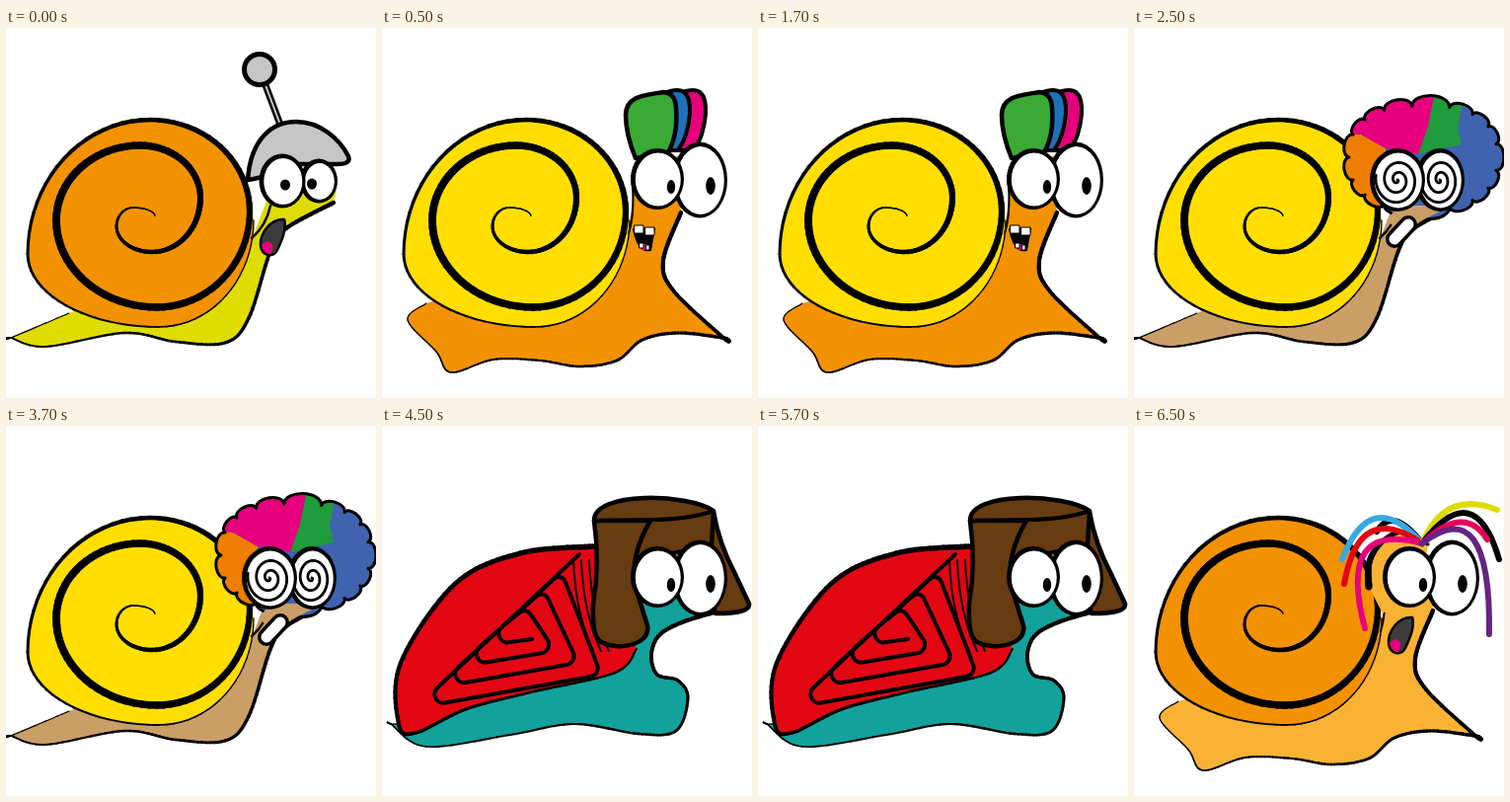
An HTML page with a canvas for the animation above (8000 ms loop, 375 by 375 pixels).

```html
<!DOCTYPE html>
<html lang="en">
<head>
<meta charset="utf-8">
<title>Snails</title>
<style>
html, body { margin: 0; width: 100%; height: 100%; overflow: hidden; background: #fff; }
canvas { display: block; width: 375px; height: 375px; }
</style>
</head>
<body>
<canvas id="c" width="375" height="375"></canvas>
<script>
const ctx = document.getElementById('c').getContext('2d');
ctx.lineCap = ctx.lineJoin = 'round';

const mix = (a, b, t) => a + (b - a) * t;

// "x,y x,y"; a trailing ! makes a sharp corner
const parse = text => text.split(' ').flatMap(t => {
  const p = t.replace('!', '').split(',').map(Number);
  return t.endsWith('!') ? [p, p] : [p];
});

// smooth curve through a few key points
function trace(text) {
  const p = parse(text), out = [];
  const at = i => p[Math.max(0, Math.min(p.length - 1, i))];
  for (let i = 0; i < p.length - 1; i++) {
    const [a, b, c, d] = [at(i - 1), at(i), at(i + 1), at(i + 2)];
    for (let t = 0; t < 1; t += 1 / 12)
      out.push([0, 1].map(j => b[j] + t / 2 * (c[j] - a[j] +
        t * (2 * a[j] - 5 * b[j] + 4 * c[j] - d[j] + t * (3 * (b[j] - c[j]) + d[j] - a[j])))));
  }
  return [...out, at(p.length)];
}

function paint(path, fill, width, stroke = '#000') {
  if (fill) { ctx.fillStyle = fill; ctx.fill(path); }
  if (width) { ctx.lineWidth = width; ctx.strokeStyle = stroke; ctx.stroke(path); }
}

const svg = (d, fill, width, stroke) => paint(new Path2D(d), fill, width, stroke);

function fillPts(pts, color) {
  const path = new Path2D();
  pts.forEach(p => path.lineTo(...p));
  paint(path, color);
}

// line whose width depends on the progress 0..1 along it
function brush(pts, width) {
  ctx.strokeStyle = '#000';
  for (let i = 1; i < pts.length; i++) {
    ctx.lineWidth = width(i / pts.length);
    ctx.beginPath();
    ctx.moveTo(...pts[i - 1]);
    ctx.lineTo(...pts[i]);
    ctx.stroke();
  }
}

function oval(x, y, rx, ry, fill, width, tilt = 0) {
  const p = new Path2D();
  p.ellipse(x, y, rx, ry, tilt, 0, 7);
  paint(p, fill, width);
}

// white sits a little right of the black rim, so the rim is thicker on the left
function eye(x, y, rx, ry) {
  oval(x, y, rx, ry, '#000');
  oval(x + .8, y + .5, rx - 4, ry - 4, '#fff');
}

function bigEyes() {
  eye(322, 154, 28, 38.5);
  eye(279, 153, 27, 31);
  oval(293, 161, 4.2, 7, '#000');
  oval(333, 160, 4.8, 9, '#000');
}

// quarter ellipses between the outermost points of each turn
function roundShell(color) {
  const ends = parse('251,195 155,303 22,229 146,93 247,186 153,283 51,195 136,119 197,172 148,227 112,201 129,182 151,191');
  const pts = [], steps = 20;
  for (let i = 0; i < ends.length - 1; i++) {
    const [x, y] = ends[i], [u, v] = ends[i + 1];
    for (let k = 0; k < steps; k++) {
      const a = k / steps * Math.PI / 2, s = Math.sin(a), c = 1 - Math.cos(a);
      pts.push(i % 2 ? [mix(x, u, s), mix(y, v, c)] : [mix(x, u, c), mix(y, v, s)]);
    }
  }
  fillPts(pts.slice(0, steps * 4), color);
  brush(pts, t => 1.3 + 6.5 * Math.sin(Math.PI * t) ** 2);
}

function body(color, edge, back) {
  const pts = trace(edge);
  fillPts([...pts, ...parse(back)], color);
  brush(pts, t => 1 + 3.4 * t);
}

function slimSnail(skin, shell) {
  body(skin, '64,289 5,314! 40,323 120,309 172,318 222,319 246,294 268,226 284,203 332,177',
    '335,165 268,165 250,212 150,250');
  roundShell(shell);
  svg('M249 213Q264 200 268 180', null, 2.5);
}

function wideSnail(skin, shell) {
  body(skin, '45,279 26,296 55,328 70,349 113,336 160,337 200,343 238,337 264,316 300,309 346,314! 296,267 285,236 303,187',
    '300,130 260,130 250,205 150,250');
  roundShell(shell);
  svg('M253 150Q257 185 250 208', null, 2);
}

function yellMouth() {
  const lips = new Path2D('M282 194C268 193 257 208 258 221C260 232 271 233 275 225C280 215 285 203 282 194Z');
  paint(lips, '#3c3c3b');
  ctx.save();
  ctx.clip(lips);
  oval(264, 224, 6, 8, '#e6007e', 0, .4);
  ctx.restore();
  paint(lips, null, 2.5);
}

function helmetSnail() {
  slimSnail('#dedc00', '#f39200');
  yellMouth();
  svg('M263 58L278 98', null, 7);
  svg('M263 58L278 98', null, 2, '#c6c6c6');
  oval(257, 42, 15.5, 15.5, '#c6c6c6', 5);
  svg('M245 154C248 112 270 95 294 95C318 95 338 112 347 130Q350 138 336 138H290Q262 152 245 154Z', '#c6c6c6', 4.5);
  eye(317, 155, 19, 22.5);
  eye(280, 155, 23.5, 27.5);
  oval(283, 159, 5, 5.5, '#000');
  oval(310, 158, 5, 5.5, '#000');
}

function quiffSnail() {
  wideSnail('#f39200', '#ffde00');
  for (const [x, color] of [[16, '#e6007e'], [0, '#1d71b8']]) {
    ctx.save();
    ctx.translate(x, 0);
    svg('M286 66C306 58 313 66 312 87Q310 110 300 124H285Z', color, 4);
    ctx.restore();
  }
  svg('M257 132Q247 108 247 88C247 68 268 68 285 65C299 66 299 78 298 100Q296 116 290 126Z', '#3aaa35', 4.5);
  bigEyes();
  svg('M255 204L276 203L272 225Q260 228 255 204Z', '#000', 2);
  oval(266, 222, 4, 3, '#e6007e');
  for (const [x, y, w, h] of [[256, 200, 9, 8], [267, 202, 9, 8], [261, 218, 4, 5], [268, 220, 3, 5]]) {
    const tooth = new Path2D();
    tooth.rect(x, y, w, h);
    paint(tooth, '#fff', 1);
  }
}

// boxy ellipse edged with equal bulges
function wigPath() {
  const n = 17, path = new Path2D();
  const soft = v => Math.sign(v) * Math.abs(v) ** .8;
  const at = i => {
    const a = (i + .5) / n * 2 * Math.PI;
    return [293 + 75 * soft(Math.cos(a)), 131 + 52 * soft(Math.sin(a))];
  };
  for (let i = 0; i < n; i++) {
    const [x, y] = at(i), [u, v] = at(i + 1), dx = (u - x) * .4, dy = (v - y) * .4;
    if (!i) path.moveTo(x, y);
    path.bezierCurveTo(x + dy, y - dx, u + dy, v - dx, u, v);
  }
  return path;
}

function swirlEye(x, y, rx, ry) {
  eye(x, y, rx, ry);
  const p = new Path2D(), end = 16;
  for (let a = 0; a < end; a += .15) {
    const r = a / end * .8;
    p.lineTo(x + Math.cos(a) * rx * r, y + Math.sin(a) * ry * r);
  }
  paint(p, null, 2.8);
}

function clownSnail() {
  slimSnail('#ca9e67', '#ffde00');
  const wig = wigPath();
  ctx.save();
  ctx.clip(wig);
  paint(wig, '#3f63ae');
  svg('M200 102L230 108L255 122L250 200H200Z', '#ef7d00');
  svg('M200 60H306L298 100L290 128L255 122L230 108L200 106Z', '#e6007e');
  svg('M306 60L298 100L288 128L332 118L328 100L336 60Z', '#1f9c3b');
  ctx.restore();
  paint(wig, null, 3);
  svg('M256 195L268 180H322L290 196L268 205Z', '#ca9e67');
  swirlEye(310, 154, 25, 32);
  swirlEye(267, 154, 28, 32);
  svg('M264 214L278 199', null, 18);
  svg('M264 214L278 199', null, 11, '#fff');
}

// triangle spiral: each corner drifts inwards turn by turn
function triangleSpiral() {
  const outer = parse('200,130 34,286 222,252'), inner = parse('146,184 96,224 152,216');
  const path = new Path2D();
  for (let i = 0; i < 12; i++) {
    const corner = k => [0, 1].map(j => mix(outer[k % 3][j], inner[k % 3][j], Math.floor(k / 3) / 3));
    if (i === 0 || i === 11) path.lineTo(...corner(i));
    else path.arcTo(...corner(i), ...corner(i + 1), i % 3 ? 9 : 7);
  }
  paint(path, null, 4);
}

function hatSnail() {
  body('#13a19b', '30,302 9,302! 45,325 130,313 195,302 260,312 298,309 310,276 300,258 279,252 273,232 281,212 304,199 336,189',
    '336,165 263,165 255,225 150,260');
  const shell = trace('258,226 236,250 150,270 85,287 34,311 17,302 19,240 74,160 140,129 214,122');
  fillPts(shell, '#e30613');
  brush(shell, t => 2 + 3.5 * t);
  triangleSpiral();
  for (let x = 194; x < 215; x += 8)
    svg(`M${x} 136Q${x + 2} 190 ${x + 20} 228`, null, 2);
  const brown = '#683c11';
  svg('M328 87H336Q342 120 357 148L372 180Q374 190 338 190L325 130Z', brown, 4.5);
  svg('M215 96C214 66 310 68 336 86L334 122L260 135Z', brown, 4.5);
  svg('M215 96L272 95Q310 95 336 86', null, 4);
  svg('M215 96H272Q252 130 256 160L269 202C272 218 252 224 237 223C216 221 213 214 214 180Q221 140 215 96Z', brown, 4.5);
  bigEyes();
}

function strandSnail() {
  const skin = '#f9b233';
  wideSnail(skin, '#f39200');
  const head = trace('238,163 238,140 247,122 264,109 280,109 298,120');
  fillPts([...head, [290, 170], [252, 190]], skin);
  brush(head, t => 7 - 4 * t);
  // bend, tip and colour of each hair
  for (const [bend, tip, color] of [
    ['262 80', '246 107', '#000'],
    ['240 60', '211 135', '#36a9e1'],
    ['228 75', '213 160', '#e30613'],
    ['205 95', '234 205', '#e6007e'],
    ['315 64', '368 85', '#dedc00'],
    ['345 50', '370 135', '#000'],
    ['335 78', '358 115', '#e5005b'],
    ['362 65', '360 211', '#662483']
  ]) svg(`M292 119Q${bend} ${tip}`, null, 6, color);
  bigEyes();
  yellMouth();
}

const scenes = [[500, helmetSnail], [2500, quiffSnail], [4500, clownSnail], [6500, hatSnail], [8000, strandSnail]];
const start = performance.now();
let shown;

function tick() {
  const t = (performance.now() - start) % 8000;
  const scene = scenes.find(([end]) => t < end)[1];
  if (scene !== shown) {
    ctx.fillStyle = '#fff';
    ctx.fillRect(0, 0, 375, 375);
    scene();
    shown = scene;
  }
  requestAnimationFrame(tick);
}
tick();
</script>
</body>
</html>
```
